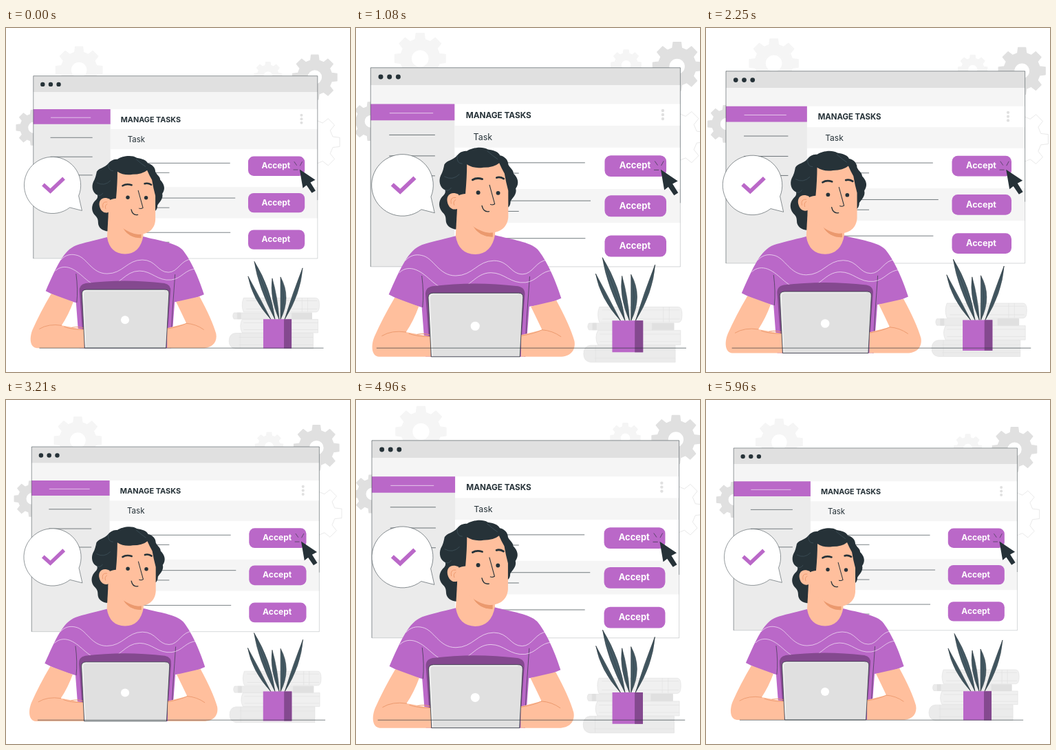
Animation of 500x500 px, one loop 6000 ms. Source, as an HTML page:

```html
<!DOCTYPE html>
<html lang="en">
<head>
<meta charset="utf-8">
<title>Manage tasks</title>
<style>
html, body { margin: 0; width: 100%; height: 100%; overflow: hidden; background: #fff; }
svg { display: block; width: 100vw; height: 100vh; }
text { font-family: Inter, "Open Sans", sans-serif; }
.purple { fill: #ba68c8; }
.plum { fill: #84498f; }
.skin { fill: #ffbf9d; }
.dark { fill: #263238; }
.pale { fill: #f5f5f5; }
.grey { fill: #e0e0e0; }
.line { fill: none; stroke: #263238; stroke-width: .6; }
.fold { fill: none; stroke: #eb996e; stroke-width: .9; stroke-linecap: round; }
.wave { fill: none; stroke: #fff; stroke-width: .6; }
</style>
</head>
<body>
<svg viewBox="0 0 500 500">
  <g data-origin="250 246">
    <g id="gears"></g>
    <g stroke="#e0e0e0" stroke-width=".6">
      <path fill="#f0f0f0" d="M345 392H450Q455 392 455 402Q455 412.500 450 412.500H345Q341 402 345 392Z"/>
      <path fill="#ebebeb" d="M331 413.500H444V422.500H331Q328 418 331 413.500Z"/>
      <path fill="#f0f0f0" d="M343 423H453V442.500H343Q338 433 343 423Z"/>
      <path fill="#ebebeb" d="M333 443H446V465.500H333Q324 464 324 454.500Q324 444 333 443Z"/>
      <path fill="none" d="M349 396H452M349 408H452M430 392V412M438 392V412M345 428H453M345 438H453M338 449H446M338 460H446M340 443V465"/>
      <path fill="#e0e0e0" d="M415 413.500H444V422.500H415ZM336 413.500H341V422.500H336Z"/>
    </g>
  </g>

  <g data-origin="246.200 202.400">
    <path fill="#fff" d="M40.300 70H452.300V334.700H40.300Z"/>
    <path class="grey" d="M40.300 70H452.300V93.300H40.300Z"/>
    <path class="pale" d="M40.300 93.300H452.300V118.300H40.300ZM152 147.200H452.300V176.200H152ZM152 231.300H452.300V276.300H152Z"/>
    <path fill="#ebebeb" d="M40.300 118.300H152V334.700H40.300Z"/>
    <path class="purple" d="M40.300 118.300H152V140H40.300Z"/>
    <path class="wave" d="M65.500 130.400H123.500"/>
    <path class="line" d="M65 159.400H126M65 187.300H126M65 213.800H126M200 196.400H325.500M200 210.300H237.500M200 247H333M200 261H237.500M200 297H326M200 311H237.500"/>
    <path class="line" stroke-opacity=".8" d="M40.300 334.700V70H452.300V250"/>
    <path class="line" stroke-opacity=".3" d="M40.300 334.700H452.300V250"/>
    <g class="dark"><circle cx="53.800" cy="82.200" r="3.200"/><circle cx="65.400" cy="82.200" r="3.200"/><circle cx="77" cy="82.200" r="3.200"/></g>
    <g class="grey"><circle cx="429" cy="127" r="2"/><circle cx="429" cy="132.500" r="2"/><circle cx="429" cy="138" r="2"/></g>
    <text class="dark" x="167" y="137" font-size="10.800" font-weight="700">MANAGE TASKS</text>
    <text class="dark" x="177" y="166" font-size="11.400">Task</text>
    <g id="buttons"></g>
    <path class="line" stroke-linecap="round" d="M418.500 194.500L422 199.500M430 194.500L427 200M417.500 206H423.500"/>
    <path class="dark" d="M426.300 205.500L431 232.700L436.300 228.500L444 239.700L449.400 236.300L442 224.500L449 220.700Z"/>
  </g>

  <g data-origin="68 228.500">
    <path fill="#fff" stroke="#263238" stroke-width=".5" d="M92.700 260.800A41 41 0 1 1 105.500 243.900L110.300 265.300Z"/>
    <path fill="none" stroke="#ba68c8" stroke-width="5.400" d="M54 227.500L64.500 237L84 218.500"/>
  </g>

  <g data-origin="391 402.500">
    <g id="leaves"></g>
    <path class="purple" d="M374 423.300H415V465.500H374Z"/>
    <path class="plum" d="M404 423.300H415V465.500H404Z"/>
  </g>

  <g data-origin="170.500 324">
    <path class="dark" d="M149 295.500C140 295 134 290 134 283C134 277 132 275 129 272C124 266 124 258 129 252C132 249 134 247 133 243C126 240 124 231 127 224C130 219 131 214 132 209C136 203 143 204 149 197C153 192 157 191 162 191C168 187 182 184 190 189C197 190 204 192 206 197C212 198 217 203 217 209C219 214 224 216 224 221C230 227 232 234 227 241C229 249 222 254 220 258C220 263 218 266 215 267L180 275Z"/>
    <path class="purple" d="M147 304C128 309 113 312 102 316C84 323 74 346 58 382Q78 393 102 399L107 464.800H240L245 398Q269 396 287.500 387C279 360 267 335 256 322C246 312 222 309 199 303Z"/>
    <path class="line" d="M102 357Q105 380 103 399M245.500 358Q244 380 242 408L239 464.800"/>
    <path class="skin" d="M149 268L147 304Q151 328 173 328.500Q195 328 199.500 302L199 286Z"/>
    <path class="fold" style="fill:#eb996e" d="M170 290Q181 300 196 299.500L196 305Q178 305 170 290Z"/>
    <path class="skin" d="M149 251Q156 248 160 248Q162 226 162 209Q171 215 184 213Q198 213 205 207Q208 214 212 221Q214 233 217 244V279C216 293 206 300 192 300C177 299 162 286 149 274Z"/>
    <path class="skin" d="M151 249C141 244 134 250 136 259C138 268 145 271 151 267Z"/>
    <path class="fold" d="M147 253Q139 252 141 261M147 256Q143 258 145 263"/>
    <g class="dark"><circle cx="177" cy="246.500" r="2.700"/><circle cx="203.500" cy="247" r="2.700"/></g>
    <path class="line" stroke-linecap="round" style="stroke-width:2.600" d="M169.500 229.500Q175 226 182.500 228.500M201.500 226.500Q206 225 211 228"/>
    <path class="line" style="stroke-width:1" d="M192 236L199 261.500Q196 263.500 193 262"/>
    <path class="line" stroke-linecap="round" style="stroke-width:1.300" d="M182 264Q184 273 191.500 271.500"/>
    <path fill="none" stroke="#455a64" stroke-width=".6" d="M132 225Q143 231 152 222M149 197Q148 208 156 208M189 191Q197 198 203 202M133 243Q138 245 141 240"/>
    <path class="wave" d="M80 337C86 330 94 328 102 330C118 333 124 357 147 357C170 357 176 337 198 337C218 337 220 355 236 355C250 355 254 336 270 336"/>
    <path class="wave" d="M72 353C78 347 86 346 94 349C112 356 120 376 142 376C166 376 172 353 194 353C212 353 220 368 240 366C256 364 260 350 277 350"/>
    <path class="plum" d="M113 464.800L107 383Q106 373 116 371Q172 364 230 371Q240 373 239 383L233 464.800Z"/>
    <path class="skin" d="M66 386Q50 413 39 438C34 450 35 464 45 464.800H114V438L81 432Q91 417 98 397.800Z"/>
    <path class="skin" d="M247 397.800Q255 414 262 429L234 436V464.800H288C301 464 307 455 305 444Q299 423 281 390Z"/>
    <path class="fold" d="M81 432Q62 429 49 437M85 434Q95 438 112 438M262 429Q276 430 287 438M234 437Q252 434 262 429M96 435Q106 433 113 436"/>
    <path class="grey" stroke="#263238" stroke-width=".7" d="M114.500 464.800L110.500 386Q110.500 380 117 380H231Q237 380 236.700 386L232.500 464.800Z"/>
    <path fill="none" stroke="#f5f5f5" stroke-width="1" d="M116 464L112.500 386Q113 382 117 381.500H230"/>
    <circle cx="173" cy="424" r="6" fill="#fff"/>
  </g>

  <g data-origin="256 465.200"><path class="line" d="M49 465.200H461"/></g>
</svg>
<script>
const byId = id => document.getElementById(id);

// Cog outline with eight teeth and an optional round hole
function gear(x, y, outer, hole, style) {
  const points = [];
  for (let tooth = 0; tooth < 8; tooth++) {
    for (const [turn, r] of [[-.31, .77], [-.2, 1], [.2, 1], [.31, .77]]) {
      const a = (tooth + turn) * Math.PI / 4;
      points.push(`${x + Math.sin(a) * r * outer} ${y - Math.cos(a) * r * outer}`);
    }
  }
  const ring = hole && `M${x - hole} ${y}a${hole} ${hole} 0 1 0 ${2 * hole} 0a${hole} ${hole} 0 1 0 ${-2 * hole} 0`;
  return `<path fill-rule="evenodd" stroke-linejoin="round" d="M${points.join("L")}Z${ring || ""}" ${style}/>`;
}

const solid = colour => `fill="${colour}" stroke="${colour}" stroke-width="1.5"`;
byId("gears").innerHTML =
  gear(106.5, 61.5, 34, 12, solid("#f5f5f5")) +
  gear(380.5, 70, 20, 7, solid("#f5f5f5")) +
  gear(448.3, 72, 32.5, 11, solid("#e0e0e0")) +
  gear(41, 145, 25.5, 9, solid("#e0e0e0")) +
  gear(443, 166, 42, 0, 'fill="#fff" stroke="#e0e0e0" stroke-width=".7"');

byId("buttons").innerHTML = [186.6, 239.9, 293.2].map(y =>
  `<rect class="purple" x="351.7" y="${y}" width="82" height="28.300" rx="8"/>
   <text x="392" y="${y + 17.6}" fill="#fff" font-size="11.900" font-weight="700" text-anchor="middle">Accept</text>`
).join("");

// Each leaf: tip, bend, base x, width
function leaf([tipX, tipY, bendX, bendY, baseX, width]) {
  const base = `${baseX} 423.5`, tip = `${tipX} ${tipY}`;
  return `<path fill="#455a64" stroke="#263238" stroke-width=".5" d="M${base}Q${bendX - width} ${bendY} ${tip}Q${bendX + width} ${bendY} ${base}Z"/>
    <path class="line" stroke-opacity=".6" d="M${base}Q${bendX} ${bendY} ${tip}"/>`;
}
byId("leaves").innerHTML = [
  [431, 349, 422, 387, 405, 6],
  [361, 339.5, 376, 378, 391, 9],
  [352, 361, 364, 394, 385, 6],
  [387, 364, 389, 392, 397, 6],
  [399, 362, 407, 391, 399, 8]
].map(leaf).join("");

const layers = [...document.querySelectorAll("[data-origin]")]
  .map(el => [el, ...el.dataset.origin.split(" ").map(Number)]);

// Quick swell, slow release, then a quick swell and release
function pulse(t) {
  if (t < 1200) return t / 1200;
  if (t < 3600) return (3600 - t) / 2400;
  return 1 - Math.abs(t - 4800) / 1200;
}

function draw() {
  const scale = 1 + .1 * pulse((performance.now() + 30) % 6000);
  for (const [el, x, y] of layers)
    el.setAttribute("transform", `translate(${x} ${y}) scale(${scale}) translate(${-x} ${-y})`);
  requestAnimationFrame(draw);
}
draw();
</script>
</body>
</html>
```
